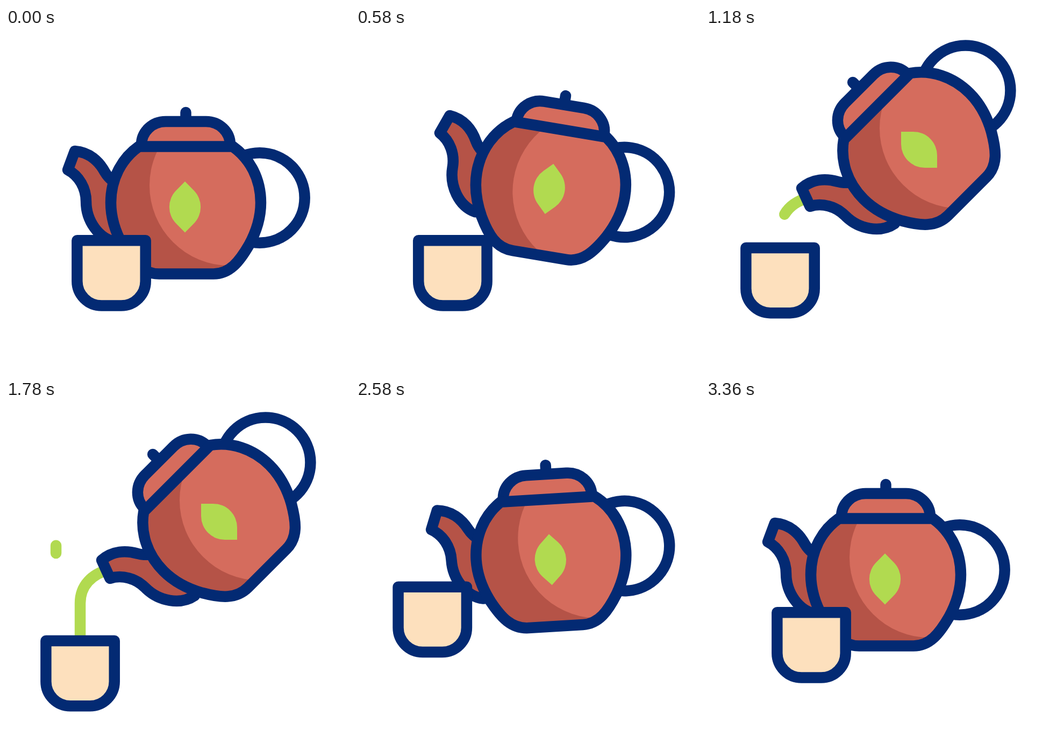
Recreate the animation shown at these times as an HTML page. Size 640 by 640 pixels, loop 3.6 s.

```html
<!DOCTYPE html>
<html lang="en">
<head>
<meta charset="utf-8">
<title>Teapot</title>
<style>
  html, body { margin: 0; width: 100%; height: 100%; overflow: hidden; background: #fff; }
  svg { display: block; width: 100%; height: 100%; }
  .line { stroke: #032a73; stroke-width: 20.5; stroke-linecap: round; stroke-linejoin: round; }
  .tea { stroke: #b1da50; stroke-width: 20.5; stroke-linecap: round; fill: none; }
</style>
</head>
<body>
<svg viewBox="0 0 640 640" fill="none">
  <defs>
    <path id="body" d="M247 220.5 H422 C454 243 474 281 474 325 C474 358 463 384 452 404
      C434 435 416 457.5 386 457.5 H285 C253 457.5 235 435 217 404
      C206 384 195 358 195 325 C195 281 215 243 247 220.5 Z"/>
    <clipPath id="inside"><use href="#body"/></clipPath>
  </defs>
  <g id="steam"></g>
  <path id="stream" class="tea" d="M190 316 C160 324 138 345 138 378 V470"/>
  <g id="pot">
    <circle class="line" cx="472" cy="316" r="83.7"/>
    <path class="line" fill="#b55347" d="M204 398 C172 392 149 358 149 323 C149 298 136 275 115 264
      L128 229 C155 231 173 248 184 268 Q190 278 198 284"/>
    <path class="line" d="M334.5 157 V174"/>
    <path class="line" fill="#d56c5d" d="M252 217 C252 193 272 174 297 174 H372 C397 174 417 193 417 217"/>
    <use href="#body" fill="#b55347"/>
    <g clip-path="url(#inside)"><circle id="light" r="149" fill="#d56c5d"/></g>
    <use href="#body" class="line"/>
    <path fill="#b1da50" transform="translate(333 333) rotate(45)"
      d="M-33.5 -33.5 h23 a44 44 0 0 1 44 44 v23 h-23 a44 44 0 0 1 -44 -44 Z"/>
  </g>
  <path id="cup" class="line" fill="#fde0bd"
    d="M132.3 395.3 h127.4 V471 a45.5 45.5 0 0 1 -45.5 45.5 h-36.4 a45.5 45.5 0 0 1 -45.5 -45.5 Z"/>
</svg>
<script>
const LOOP = 3600, RISE = 70;
const $ = id => document.getElementById(id);
const move = (id, x, y, more = '') => $(id).setAttribute('transform', `translate(${x} ${y}) ${more}`);

const ramp = (t, from, to) => Math.min(1, Math.max(0, (t - from) / (to - from)));
const ease = (t, from, to) => (1 - Math.cos(Math.PI * ramp(t, from, to))) / 2;

// Shows only the stretch of a path between two lengths.
function trim(path, from, to) {
  path.style.display = to - from > 0.1 ? '' : 'none';
  path.style.strokeDasharray = `0 ${from} ${to - from} 2000`;
}

const stream = $('stream'), flow = stream.getTotalLength();
const wisps = [93, 53, 13].map(x => {
  const p = document.createElementNS('http://www.w3.org/2000/svg', 'path');
  p.setAttribute('class', 'tea');
  p.setAttribute('d', `M${x} 285 v${-RISE}`);
  $('steam').append(p);
  return p;
});

function drawPot(t) {
  const settle = ease(t, 3000, 3360);
  const x = 333 + 63.5 * ease(t, 315, 910) - 64.5 * ease(t, 2222, 2907) + settle;
  const y = 333 - 106.5 * ease(t, 388, 896) + 123 * ease(t, 2197, 2900) - 16.5 * settle;
  const turn = 9.5 * ease(t, 240, 580) - 54.5 * ease(t, 580, 1080) + 45 * ease(t, 2160, 2673);
  move('pot', x, y, `rotate(${turn}) translate(-333 -333)`);

  // The highlight slides down as the pot lifts, and keeps upright as it turns.
  const dx = 83 - 7.5 * ease(t, 300, 1080) + 13 * ease(t, 2160, 2580) - 5.5 * settle;
  const dy = -40 + 45.5 * (ease(t, 300, 580) - ease(t, 580, 1080))
    + 11 * (ease(t, 2580, 3060) - settle);
  const a = turn * Math.PI / 180, c = Math.cos(a), s = Math.sin(a);
  $('light').setAttribute('cx', 333 + dx * c + dy * s);
  $('light').setAttribute('cy', 333 - dx * s + dy * c);
}

function draw(t) {
  drawPot(t);
  move('cup',
    58 * (ease(t, 2484, 3044) - ease(t, 306, 1084)),
    56 * ease(t, 800, 1960) - 103.5 * ease(t, 2050, 2580) + 47.5 * ease(t, 2580, 3030));

  trim(stream, flow * ramp(t, 1960, 2160), flow * ramp(t, 1120, 1320));
  wisps.forEach((p, i) => {
    const u = t - i * 80;
    trim(p, RISE * ramp(u, 2100, 2320), RISE * ramp(u, 1730, 1980));
  });
}

const start = performance.now();
function tick() {
  draw((performance.now() - start) % LOOP);
  requestAnimationFrame(tick);
}
tick();
</script>
</body>
</html>
```
